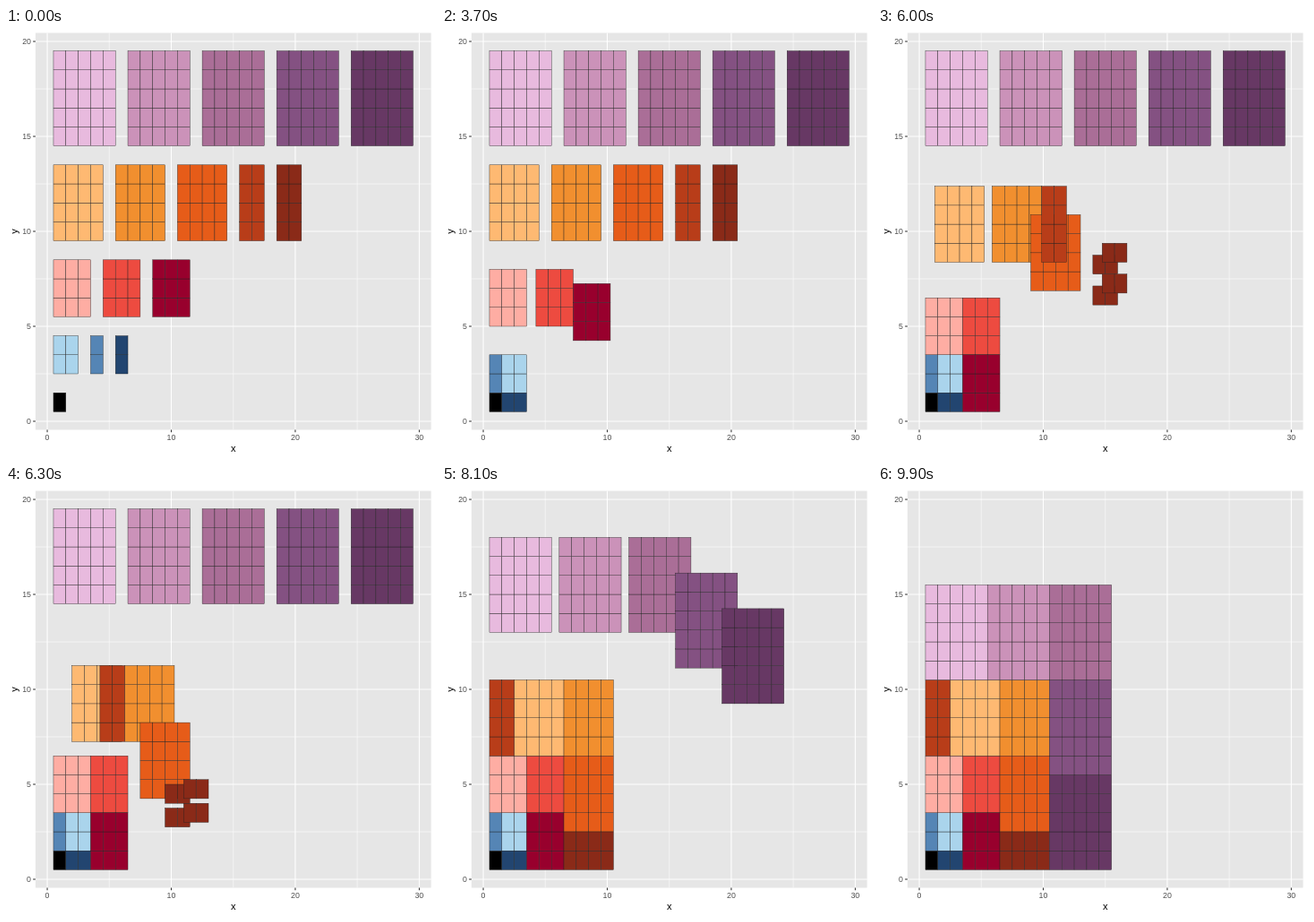
Animation, 480 px wide and 480 px high, one loop 10000 ms. Source, as an HTML page:

```html
<!DOCTYPE html>
<html lang="en">
<head>
<meta charset="utf-8">
<title>Sum of cubes</title>
<style>
  html, body { margin: 0; width: 100%; height: 100%; overflow: hidden; background: #fff; }
  svg { display: block; width: 480px; height: 480px; }
  text { font-family: "Liberation Sans", Arial, sans-serif; text-anchor: middle; }
  .label { font-size: 8.8px; fill: #4d4d4d; }
  .left { text-anchor: end; }
  .title { font-size: 11px; fill: #000; }
  .tile { stroke: #222; stroke-width: .4px; }
</style>
</head>
<body>
<svg id="plot" viewBox="0 0 480 480"></svg>
<script>
const LOOP = 10000, STEP = 100, MOVE = 800;
const UX = 13.843, UY = 21.2;
const LEFT = 32.9, RIGHT = 474.5, TOP = 5.5, BOTTOM = 448.5;
const px = x => 46.05 + UX * x;
const py = y => 439 - UY * y;

const plot = document.getElementById('plot');

function add(name, attrs, text) {
  const el = document.createElementNS('http://www.w3.org/2000/svg', name);
  for (const key in attrs) el.setAttribute(key, attrs[key]);
  if (text !== undefined) el.textContent = text;
  return plot.appendChild(el);
}

function line(x1, y1, x2, y2, stroke, width) {
  add('line', { x1, y1, x2, y2, stroke, 'stroke-width': width });
}

function drawAxes() {
  add('rect', { x: LEFT, y: TOP, width: RIGHT - LEFT, height: BOTTOM - TOP, fill: '#e6e6e6' });
  for (let v = 5; v < 30; v += 10) line(px(v), TOP, px(v), BOTTOM, '#fff', .53);
  for (let v = 2.5; v < 20; v += 5) line(LEFT, py(v), RIGHT, py(v), '#fff', .53);
  for (let v = 0; v <= 30; v += 10) {
    line(px(v), TOP, px(v), BOTTOM, '#fff', 1.07);
    line(px(v), BOTTOM, px(v), BOTTOM + 2.75, '#333', 1.07);
    add('text', { x: px(v), y: 460, class: 'label' }, v);
  }
  for (let v = 0; v <= 20; v += 5) {
    line(LEFT, py(v), RIGHT, py(v), '#fff', 1.07);
    line(LEFT - 2.75, py(v), LEFT, py(v), '#333', 1.07);
    add('text', { x: 28, y: py(v) + 3.2, class: 'label left' }, v);
  }
  add('text', { x: 253.7, y: 472.7, class: 'title' }, 'x');
  add('text', { transform: 'translate(12.8 227) rotate(-90)', class: 'title' }, 'y');
}

// Per level: start of its move, then blocks of
// [colour, start column, end column, end row, width (default: level), folded]
const levels = [
  { start: 0, blocks: [['#000000', 1, 1, 1]] },
  { start: 1300, blocks: [
    ['#aad4ec', 1, 2, 2],
    ['#5585b5', 4, 1, 2, 1],
    ['#224570', 6, 2, 1, 1, true]] },
  { start: 3500, blocks: [
    ['#feada3', 1, 1, 4],
    ['#ed4b40', 5, 4, 4],
    ['#98002d', 9, 4, 1]] },
  { start: 5700, blocks: [
    ['#feb972', 1, 3, 7],
    ['#f18f2f', 6, 7, 7],
    ['#e65c19', 11, 7, 3],
    ['#b83d19', 16, 1, 7, 2],
    ['#8a2a18', 19, 7, 1, 2, true]] },
  { start: 7800, blocks: [
    ['#e8bade', 1, 1, 11],
    ['#cb92b9', 7, 6, 11],
    ['#aa6e97', 13, 11, 11],
    ['#845182', 19, 11, 6],
    ['#673864', 25, 11, 1]] }
];

const tiles = [];

function addBlock(n, start, [fill, col, endCol, endRow, width = n, folded]) {
  const row = n * (n + 1) / 2;
  for (let j = 0; j < n; j++) {
    for (let i = 0; i < width; i++) {
      tiles.push({
        start,
        x0: col + i,
        y0: row + j,
        // Folded blocks put every second row beside the one below it
        x1: endCol + i + (folded ? width * (j % 2) : 0),
        y1: endRow + (folded ? j >> 1 : j),
        el: add('rect', { class: 'tile', fill, width: UX, height: UY })
      });
    }
  }
}

function draw(time) {
  for (const { el, start, x0, y0, x1, y1 } of tiles) {
    const p = Math.min(1, Math.max(0, (time - start) / MOVE));
    el.setAttribute('x', px(x0 + (x1 - x0) * p - .5));
    el.setAttribute('y', py(y0 + (y1 - y0) * p + .5));
  }
}

drawAxes();
levels.forEach(({ start, blocks }, k) => blocks.forEach(b => addBlock(k + 1, start, b)));

const begin = performance.now();
let shown = -1;

function tick() {
  const time = Math.floor((performance.now() - begin) % LOOP / STEP) * STEP;
  if (time !== shown) draw(shown = time);
  requestAnimationFrame(tick);
}
tick();
</script>
</body>
</html>
```
